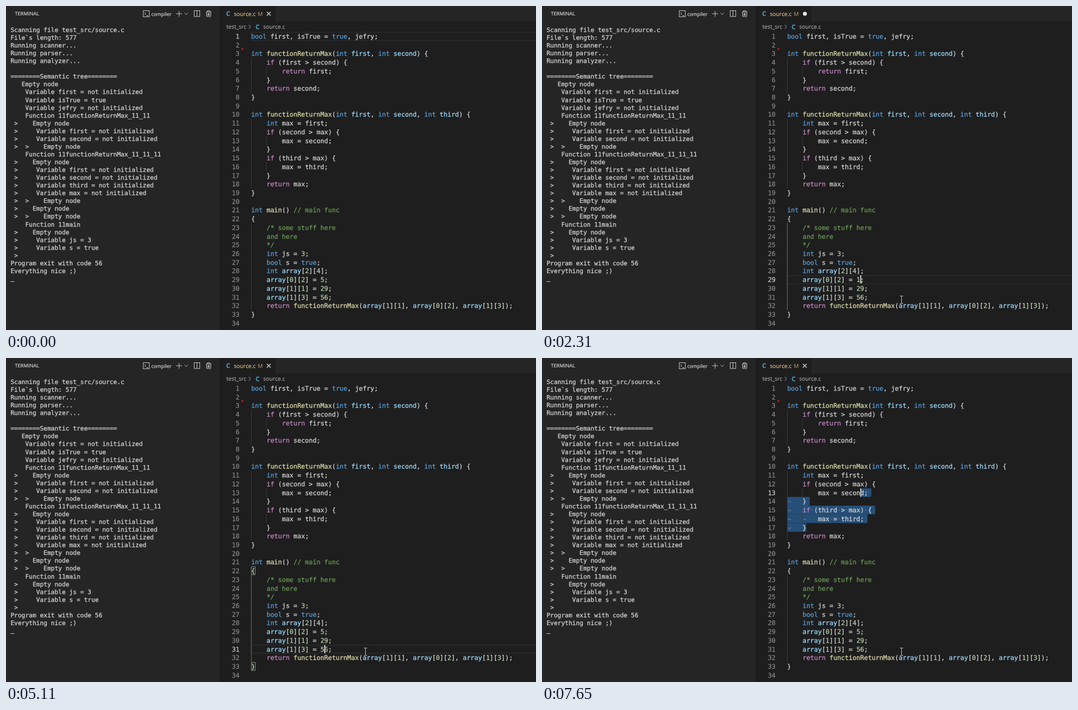
An HTML page for the animation above (8000 ms loop, 956x586 px).

```html
<!DOCTYPE html>
<html lang="en">
<head>
<meta charset="utf-8">
<title>Compiler session</title>
<style>
  html, body { margin: 0; width: 100%; height: 100%; overflow: hidden; background: #1e1e1e; }
  svg { display: block; width: 956px; height: 586px; }
  text { white-space: pre; text-rendering: geometricPrecision; fill: currentColor; stroke: currentColor; }
  .code, .term { font-family: "DejaVu Sans Mono", monospace; font-variant-ligatures: none; }
  .code { font-size: 11.53px; color: #d4d4d4; stroke-width: .28; }
  .term { font-size: 11px; color: #cccccc; stroke-width: .35; }
  .ui { font-family: "Open Sans", "Noto Sans", sans-serif; font-size: 10.2px; color: #a9a9a9; stroke-width: .15; }
  .title { font-size: 9.1px; color: #e0e0e0; }
  .task { font-size: 8.9px; color: #e0e0e0; }
  .tab { color: #e2c08d; }
  .mark { color: #a58f6c; }
  .badge { font-weight: 700; font-size: 11.5px; color: #519aba; }
  .icon { fill: none; stroke: #c5c5c5; stroke-width: 1; }
  .kw { color: #569cd6; }
  .ctl { color: #c586c0; }
  .fn { color: #dcdcaa; }
  .arg { color: #9cdcfe; }
  .num { color: #b5cea8; }
  .note { color: #6a9955; }
  .row { color: #858585; text-anchor: end; }
  .row.lit { color: #c6c6c6; }
  .ws { opacity: .25; }
</style>
</head>
<body>
<svg viewBox="0 0 956 586">
  <rect width="956" height="586" fill="#1e1e1e"/>
  <rect width="385" height="586" fill="#252526"/>
  <rect x="385" width="571" height="28" fill="#252526"/>
  <rect x="385" width="101" height="28" fill="#1e1e1e"/>

  <g class="ui">
    <text class="title" x="16" y="17.3">TERMINAL</text>
    <text class="task" x="262" y="17.5">compiler</text>
    <text class="badge" x="397" y="18.2">C</text>
    <text class="tab" x="411" y="18">source.c</text>
    <text class="mark" x="454" y="18">M</text>
    <text x="397.5" y="41.3">test_src</text>
    <text class="badge" x="450" y="42">C</text>
    <text x="464" y="41.3">source.c</text>
  </g>
  <g class="icon">
    <rect x="247.5" y="8.5" width="11" height="11"/>
    <path d="M249.5 11.5l2.7 2.5-2.7 2.5M253 17.5h4"/>
    <path d="M307 14h10.5M312.2 8.8v10.5"/>
    <path d="M322 12.5l3 3 3-3"/>
    <rect x="339.5" y="8.5" width="10" height="10.5"/>
    <path d="M344.5 8.5v10.5"/>
    <path d="M360.5 10.5h10M363.5 10v-1.5h4v1.5M361.5 10.5l.4 8.5h7.2l.4-8.5M364 12.5v5M365.5 12.5v5M367 12.5v5"/>
    <path d="M438 34l3.5 3.5-3.5 3.5" stroke="#a9a9a9"/>
    <path id="close" d="M470.5 10.5l7 7M477.5 10.5l-7 7" stroke="#e0e0e0" stroke-width="1.2"/>
  </g>
  <circle id="dirty" cx="474.2" cy="14" r="3.6" fill="#e8e8e8"/>

  <g id="term" class="term"></g>
  <g id="under"></g>
  <path d="M425 74.5l3.5 3.3-3.5 3.3z" fill="#b5202a"/>
  <rect id="changed" x="425" y="487" width="2.8" height="15.7" fill="#0c7d9d"/>
  <g id="code" class="code"></g>
  <rect id="caret" width="2" height="15" fill="#c8c9c7"/>
  <g id="mouse" fill="none" stroke-linecap="square">
    <path id="beam" d="M-2.5 -6.5h2l.5.5.5-.5h2M0 -6v12.5M-2.5 7h2l.5-.5.5.5h2" stroke="#111" stroke-width="2.2"/>
    <use href="#beam" id="core"/>
    <path d="M-2.5 -6.5h2l.5.5.5-.5h2M0 -6v12.5M-2.5 7h2l.5-.5.5.5h2" stroke="#d8d8d8"/>
  </g>
</svg>

<script>
const LOOP = 8000, X0 = 442.2, CW = 6.942, TOP = 47, ROW = 15.72, TERM_ROW = 14.06;
const $ = id => document.getElementById(id);
const colX = c => X0 + c * CW;
const rowY = n => TOP + (n - 1) * ROW;
const within = (t, a, b) => t >= a && t < b;

const source = `bool first, isTrue = true, jefry;

int functionReturnMax(int first, int second) {
    if (first > second) {
        return first;
    }
    return second;
}

int functionReturnMax(int first, int second, int third) {
    int max = first;
    if (second > max) {
        max = second;
    }
    if (third > max) {
        max = third;
    }
    return max;
}

int main() // main func
{
    /* some stuff here
    and here
    */
    int js = 3;
    bool s = true;
    int array[2][4];
    array[0][2] = 5;
    array[1][1] = 29;
    array[1][3] = 56;
    return functionReturnMax(array[1][1], array[0][2], array[1][3]);
}
`.split('\n');
const line = n => source[n - 1];
const level = n => line(n) ? line(n).search(/\S/) / 4 : 0;

const log = (size, exit) => `Scanning file test_src/source.c
File\`s length: ${size}
Running scanner...
Running parser...
Running analyzer...

========Semantic tree========
   Empty node
    Variable first = not initialized
    Variable isTrue = true
    Variable jefry = not initialized
    Function 11functionReturnMax_11_11
 >    Empty node
 >     Variable first = not initialized
 >     Variable second = not initialized
 >  >    Empty node
    Function 11functionReturnMax_11_11_11
 >    Empty node
 >     Variable first = not initialized
 >     Variable second = not initialized
 >     Variable third = not initialized
 >     Variable max = not initialized
 >  >    Empty node
 >    Empty node
 >  >    Empty node
    Function 11main
 >    Empty node
 >     Variable js = 3
 >     Variable s = true
 >
Program exit with code ${exit}
Everything nice ;)
`.split('\n');

// Caret moves: time, line, optional column (otherwise the sticky column 19)
const moves = [
  [0, 1, 0], [1310, 29], [1420, 29], [2310, 29], [2410, 29, 20], [2490, 29, 21], [4240, 29],
  [5050, 30], [5110, 31], [5610, 30], [5850, 29], [5880, 28], [6310, 27]
];
for (let k = 0; k < 9; k++) moves.push([6560 + k * 34, 26 - k]);
moves.push([6980, 17], [7290, 16], [7580, 15], [7610, 14], [7650, 13]);

const body = [[22, 0], [33, 0]];
const brackets = [
  [0, []], [1370, body], [1480, []], [2340, body], [4300, []], [5110, body],
  [5920, [[28, 16], [28, 18]]], [6380, body], [6870, [[10, 56], [19, 0]]],
  [7040, [[15, 21], [17, 4]]], [7350, []]
];
const path = [[140, 710, 586], [940, 559.5, 515], [1170, 574, 502], [1500, 574, 502], [1890, 649, 531]];

const last = (list, t) => list.filter(e => e[0] <= t).pop();

function kind(word, n, after) {
  if (/^(int|bool|true)$/.test(word)) return 'kw';
  if (/^(if|return)$/.test(word)) return 'ctl';
  if (/^\d/.test(word)) return 'num';
  if (after === '(' && /^\w/.test(word)) return 'fn';
  if (word === 'array' || (/^int f/.test(line(n)) && /^\w/.test(word))) return 'arg';
  return '';
}

const codeText = (x, n, cls, s) =>
  `<text x="${x.toFixed(2)}" y="${(rowY(n) + 12).toFixed(2)}" class="${cls}">${s}</text>`;

function paintLine(text, n) {
  if (n >= 23 && n <= 25) return codeText(colX(4), n, 'note', text.trim());
  let out = '';
  for (const m of text.matchAll(/\/\/.*|\w+|[^\s\w]+/g)) {
    const cls = m[0].startsWith('//') ? 'note' : kind(m[0], n, text[m.index + m[0].length]);
    out += codeText(colX(m.index), n, cls, m[0]);
  }
  return out;
}

function box(n, from, to, attrs) {
  return `<rect x="${colX(from)}" y="${rowY(n)}" width="${(to - from) * CW}" height="${ROW}" ${attrs}/>`;
}

function paintSelection([l1, c1, l2, c2]) {
  let out = '', marks = '';
  for (let n = l1; n <= l2; n++) {
    const from = n === l1 ? c1 : 0;
    const end = n === l2 ? c2 : line(n).length;
    out += box(n, from, end + (n < l2 ? .87 : 0), 'rx="2" fill="#264f78"');
    for (let c = from; c < end; c++) {
      if (line(n)[c] !== ' ') continue;
      const tab = c < level(n) * 4;
      if (tab && c % 4) continue;
      marks += codeText(colX(c), n, 'code ws', tab ? '→' : '·');
    }
  }
  return out + marks;
}

function paintGuides(active) {
  const lvl = active ? level(active) : 0;
  let a = active, b = active, out = '';
  if (lvl) {
    while (level(a - 1) >= lvl) a--;
    while (level(b + 1) >= lvl) b++;
  }
  for (let n = 1; n < source.length; n++)
    for (let i = 0; i < level(n); i++) {
      const lit = i === lvl - 1 && n >= a && n <= b;
      out += `<rect x="${Math.floor(colX(i * 4))}" y="${rowY(n)}" width="1" height="${ROW}" fill="${lit ? '#707070' : '#3a3a3a'}"/>`;
    }
  return out;
}

const cache = {};
function fill(id, html) {
  if (cache[id] !== html) $(id).innerHTML = cache[id] = html;
}
const show = (id, on) => $(id).style.display = on ? '' : 'none';

function drawTerminal(t) {
  let rows = within(t, 3190, 4980) ? log(579, 120) : log(577, 56);
  if (within(t, 4980, 5050)) rows = [rows[0], ''];
  const y = i => 47 + i * TERM_ROW;
  const text = rows.map((s, i) => `<text x="8.2" y="${y(i).toFixed(2)}">${s}</text>`).join('');
  fill('term', text + `<rect x="8.2" y="${Math.round(y(rows.length - 1)) + 1}" width="6.6" height="1" fill="#cccccc"/>`);
}

function drawEditor(t) {
  const [since, n, want = 19] = last(moves, t);
  const value = within(t, 2310, 2410) ? '1' : within(t, 2410, 2490) ? '12' : within(t, 2490, 4240) ? '120' : '5';
  const textOf = k => k === 29 ? line(29).replace('5', value) : line(k);
  const col = Math.min(want, textOf(n).length);

  const word = within(t, 1420, 2310) || within(t, 4240, 5050);
  const sel = word ? [29, 18, 29, 19] : t >= 7290 ? [n, col, 17, 5] : null;

  let under = '';
  if (sel) under += paintSelection(sel);
  else under += `<rect x="442" y="${rowY(n) + .5}" width="530" height="${ROW - 1}" fill="none" stroke="#2b2b2b" stroke-width="1.5"/>`;
  under += paintGuides(sel ? 0 : n);
  if (within(t, 1480, 2310) || within(t, 4300, 5050)) under += box(31, 18, 19, 'fill="#add6ff" fill-opacity=".15"');
  if (within(t, 5360, 5610)) under += box(31, 18, 20, 'fill="#575757" fill-opacity=".72"');
  for (const [l, c] of last(brackets, t)[1])
    under += `<rect x="${Math.floor(colX(c)) + .5}" y="${Math.round(rowY(l)) + .5}" width="7" height="14.5" fill="#006400" fill-opacity=".1" stroke="#888"/>`;
  fill('under', under);

  fill('code', source.map((_, i) => {
    const k = i + 1;
    return codeText(421.3, k, k === n ? 'row lit' : 'row', k) + paintLine(textOf(k), k);
  }).join(''));

  show('caret', t >= 1310 && Math.floor((t - since + 20) / 500) % 2 === 0);
  $('caret').setAttribute('x', Math.floor(colX(col)));
  $('caret').setAttribute('y', Math.round(rowY(n)));

  const unsaved = within(t, 2310, 3160) || within(t, 4240, 4640);
  show('dirty', unsaved);
  show('close', !unsaved);
  show('changed', within(t, 2720, 4440));
}

function drawMouse(t) {
  show('mouse', t >= 140);
  let i = path.findIndex(p => p[0] > t);
  if (i < 0) i = path.length;
  const a = path[Math.max(0, i - 1)], b = path[Math.min(i, path.length - 1)];
  const p = b[0] > a[0] ? Math.max(0, (t - a[0]) / (b[0] - a[0])) : 0;
  const e = i === 1 ? 1 - (1 - p) ** 2 : p * p * (3 - 2 * p);
  const mix = k => Math.round(a[k] + (b[k] - a[k]) * e);
  $('mouse').setAttribute('transform', `translate(${mix(1) - .5} ${mix(2)})`);
}

const start = performance.now();
function frame() {
  const t = Math.max(0, performance.now() - start) % LOOP;
  drawTerminal(t);
  drawEditor(t);
  drawMouse(t);
  requestAnimationFrame(frame);
}
frame();
</script>
</body>
</html>
```
